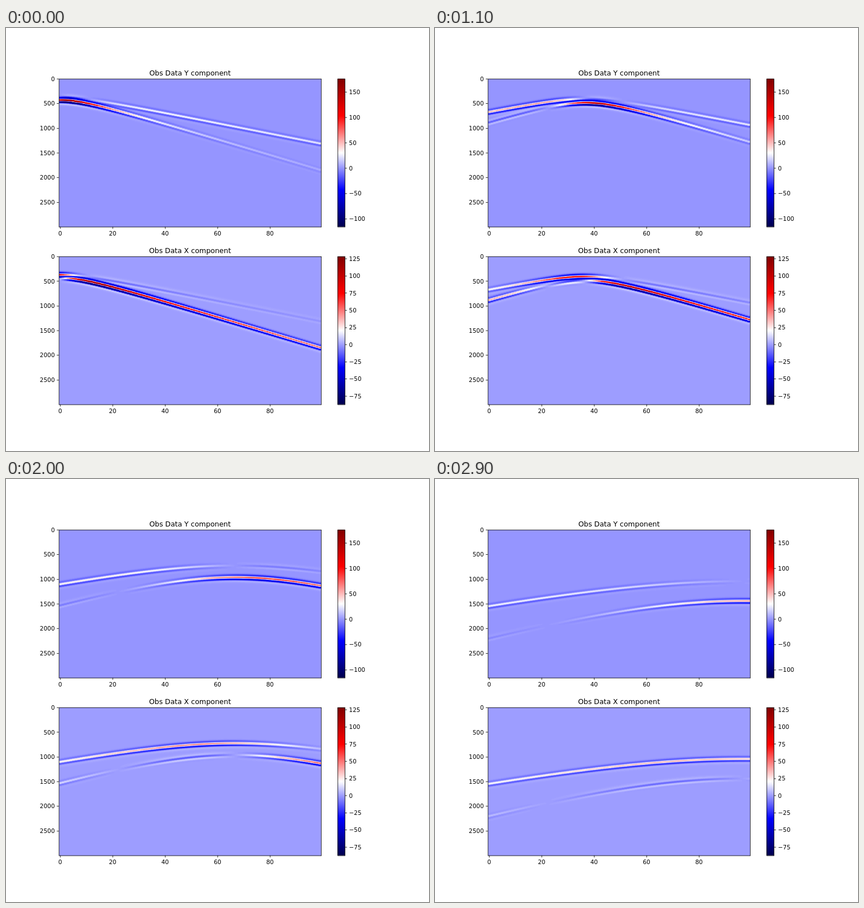
Recreate the animation shown at these times as an HTML page with a canvas. Size 748x748 px, loop 3000 ms.

```html
<!DOCTYPE html>
<html lang="en">
<head>
<meta charset="utf-8">
<title>Obs Data</title>
<style>
  html, body { margin: 0; width: 100%; height: 100%; overflow: hidden; background: #fff; }
  canvas { display: block; }
</style>
</head>
<body>
<canvas id="stage" width="748" height="748"></canvas>
<script>
const ctx = document.getElementById('stage').getContext('2d');

// Layout in figure units; the 1000-unit figure is scaled to the stage.
const SCALE = 0.748, LEFT = 125, WIDTH = 620, HEIGHT = 350;
const BAR_X = 783.75, BAR_W = 17.5, TICK = 4.86, GAP = 9.72, LINE = 1.11;
const SHOTS = 30, STEP_MS = 100, RECEIVERS = 100, SAMPLES = 3000;

const panels = [
  { title: 'Obs Data Y component', top: 120, min: -116, max: 176, step: 50 },
  { title: 'Obs Data X component', top: 540, min: -87.4, max: 128.3, step: 25 },
];
for (const p of panels) {
  p.canvas = new OffscreenCanvas(WIDTH, HEIGHT);
  p.ctx = p.canvas.getContext('2d');
  p.image = p.ctx.createImageData(WIDTH, HEIGHT);
  p.traces = new Float32Array(RECEIVERS * HEIGHT);
}

// Diverging map: dark blue, blue, white, red, dark red.
const STOPS = [[0, 0, 76], [0, 0, 255], [255, 255, 255], [255, 0, 0], [128, 0, 0]];
const palette = Array.from({ length: 256 }, (_, i) => {
  const pos = i / 255 * 4, k = Math.min(3, Math.floor(pos));
  return STOPS[k].map((c, j) => c + (STOPS[k + 1][j] - c) * (pos - k));
});

// Ricker pulse with a phase turn, peaking at t = 0.
const PULSE = 37, PHASE = 55 * Math.PI / 180;
function wavelet(t) {
  const u = t / PULSE - 0.25, q = u * u;
  if (q > 14) return 0;
  return Math.exp(-q) / 1.02 *
    (Math.cos(PHASE) * (1 - 2 * q) - Math.sin(PHASE) * u * (3 - 2 * q));
}

const DELAY = 260, SLOW_S = 15.95, SLOW_P = SLOW_S * 0.664;
const AMP_S = 503, AMP_P = 273;

// Diagonal point force in a uniform medium: one P and one S arrival.
function computeTraces(shot) {
  const sourceX = shot * 10 / 3, depth = 11 + (shot * 110 / 3) % 100;
  const [py, px] = panels.map(p => p.traces);
  for (let k = 0; k < RECEIVERS; k++) {
    const dx = k - sourceX, r2 = dx * dx + depth * depth, r = Math.sqrt(r2);
    const ampP = AMP_P * (depth - dx) / r2 / Math.sqrt(r);
    const ampS = AMP_S * (depth + dx) / r2 / Math.sqrt(r);
    for (let row = 0; row < HEIGHT; row++) {
      const t = (row + 0.5) * SAMPLES / HEIGHT - 0.5 - DELAY;
      const p = ampP * wavelet(t - r * SLOW_P), s = ampS * wavelet(t - r * SLOW_S);
      py[k * HEIGHT + row] = s * depth - p * dx;
      px[k * HEIGHT + row] = s * dx + p * depth;
    }
  }
}

function paintTraces({ traces, image, min, max, ctx: target }) {
  for (let x = 0; x < WIDTH; x++) {
    const pos = Math.max(0, Math.min(RECEIVERS - 1, (x + 0.5) * RECEIVERS / WIDTH - 0.5));
    const k = Math.min(RECEIVERS - 2, Math.floor(pos));
    const w = 0.5 + 0.5 * Math.cos(Math.PI * (pos - k));
    for (let y = 0; y < HEIGHT; y++) {
      const a = k * HEIGHT + y;
      const value = traces[a] * w + traces[a + HEIGHT] * (1 - w);
      const level = Math.max(0, Math.min(255, Math.round((value - min) / (max - min) * 255)));
      const o = (y * WIDTH + x) * 4, color = palette[level];
      image.data[o] = color[0];
      image.data[o + 1] = color[1];
      image.data[o + 2] = color[2];
      image.data[o + 3] = 255;
    }
  }
  target.putImageData(image, 0, 0);
}

const snap = v => Math.floor(v + 0.5) + 0.5;

function label(text, x, y, align, size = 13.89) {
  ctx.font = `${size}px "DejaVu Sans", sans-serif`;
  ctx.textAlign = align;
  ctx.fillText(text, x, y);
}

function tick(x, y, dx, dy) {
  ctx.beginPath();
  ctx.moveTo(x, y);
  ctx.lineTo(x + dx, y + dy);
  ctx.stroke();
}

function frame(x, y, w, h) {
  ctx.strokeRect(snap(x), snap(y), snap(x + w) - snap(x), snap(y + h) - snap(y));
}

function drawPanel(p) {
  const { top, min, max, step } = p, bottom = top + HEIGHT;
  ctx.drawImage(p.canvas, LEFT, top, WIDTH, HEIGHT);
  const gradient = ctx.createLinearGradient(0, bottom, 0, top);
  STOPS.forEach((c, i) => gradient.addColorStop(i / 4, `rgb(${c})`));
  ctx.fillStyle = gradient;
  ctx.fillRect(BAR_X, top, BAR_W, HEIGHT);

  ctx.fillStyle = ctx.strokeStyle = '#000';
  ctx.lineWidth = LINE;
  frame(LEFT, top, WIDTH, HEIGHT);
  frame(BAR_X, top, BAR_W, HEIGHT);
  label(p.title, LEFT + WIDTH / 2, top - 8.33, 'center', 16.67);

  for (let v = 0; v < RECEIVERS; v += 20) {
    const x = LEFT + (v + 0.5) * WIDTH / RECEIVERS;
    tick(snap(x), bottom, 0, TICK);
    label(v, x, bottom + GAP + 10.8, 'center');
  }
  for (let v = 0; v < SAMPLES; v += 500) {
    const y = top + (v + 0.5) * HEIGHT / SAMPLES;
    tick(LEFT, snap(y), -TICK, 0);
    label(v, LEFT - GAP, y + 5.3, 'right');
  }
  for (let v = Math.ceil(min / step) * step; v <= max; v += step) {
    const y = bottom - (v - min) / (max - min) * HEIGHT;
    tick(BAR_X + BAR_W, snap(y), TICK, 0);
    label(v < 0 ? '\u2212' + -v : Math.abs(v), BAR_X + BAR_W + GAP, y + 5.3, 'left');
  }
}

let shown = -1;
function render() {
  const shot = Math.floor(performance.now() / STEP_MS) % SHOTS;
  if (shot !== shown) {
    shown = shot;
    computeTraces(shot);
    ctx.setTransform(1, 0, 0, 1, 0, 0);
    ctx.fillStyle = '#fff';
    ctx.fillRect(0, 0, 748, 748);
    ctx.scale(SCALE, SCALE);
    ctx.imageSmoothingQuality = 'high';
    for (const p of panels) {
      paintTraces(p);
      drawPanel(p);
    }
  }
  requestAnimationFrame(render);
}
render();
</script>
</body>
</html>
```
